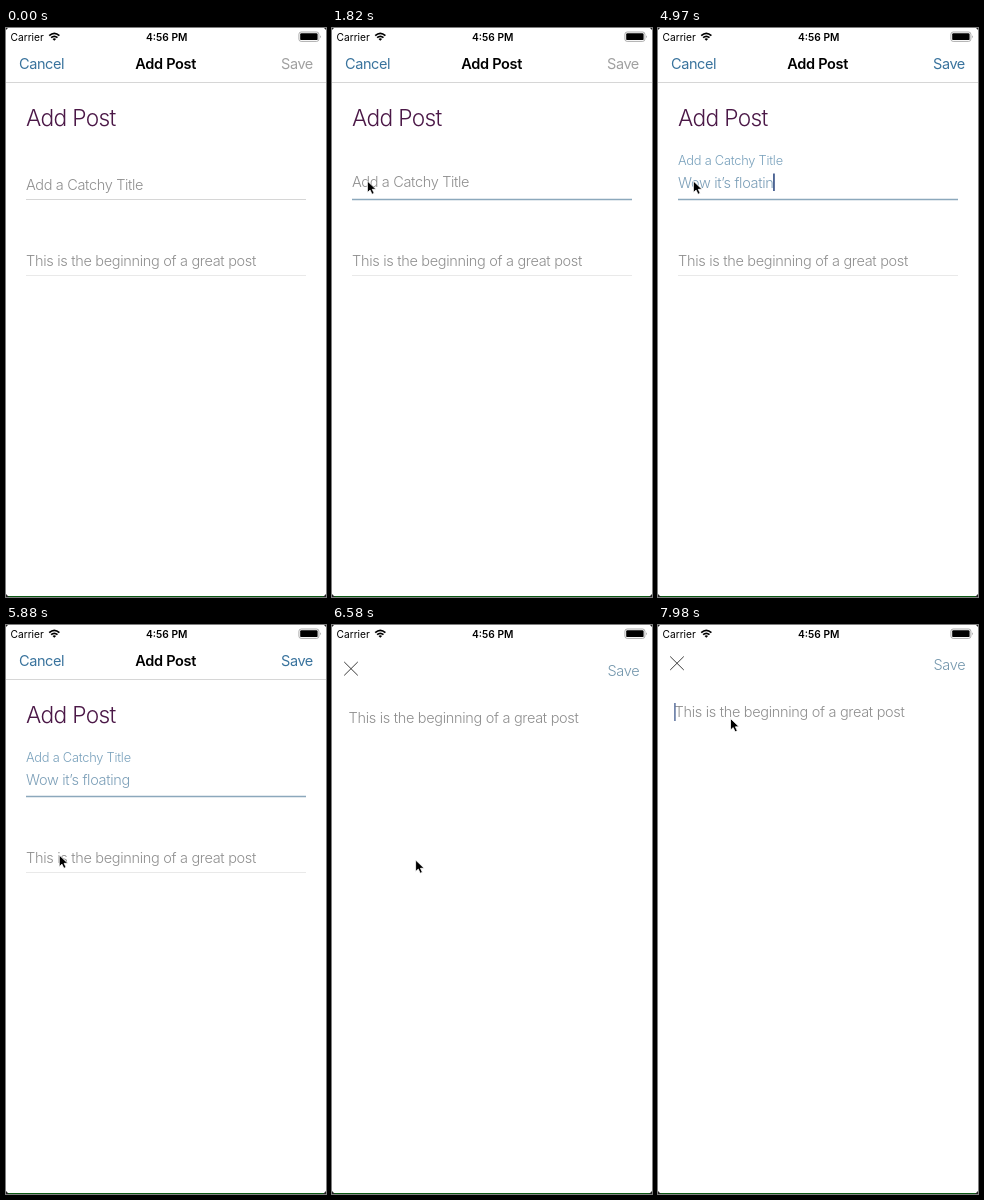
Recreate the animation shown at these times as an HTML page. Size 320 by 569 pixels, loop 8 s.

```html
<!DOCTYPE html>
<html lang="en">
<head>
<meta charset="utf-8">
<title>Add Post</title>
<style>
  html, body { margin: 0; width: 100%; height: 100%; overflow: hidden; background: #fff; }
  svg { display: block; width: 100vw; height: 100vh; }
  text { font: 300 14.5px Inter, "Open Sans", sans-serif; letter-spacing: -.31px; white-space: pre; }
  .hint { fill: #8f8f8f; }
  .link { fill: #39739d; font-weight: 400; letter-spacing: -.42px; }
  .heading { font-size: 22.7px; letter-spacing: -.65px; fill: #4b1847; }
  .bar { font-size: 10.2px; font-weight: 400; letter-spacing: 0; }
  .strong { font-weight: 600; text-anchor: middle; }
  .caret { fill: #465f90; }
</style>
</head>
<body>
<svg viewBox="0 0 320 569">
  <rect width="320" height="569" fill="#fff"/>

  <g id="form">
    <text class="link" x="13" y="41.2">Cancel</text>
    <text class="strong" x="159.7" y="41.2">Add Post</text>
    <text class="link" id="save" x="275" y="41.2">Save</text>
    <path d="M0 54.5H320" stroke="#d6d6d6"/>
    <text class="heading" x="20" y="98">Add Post</text>
    <text id="label" x="20">Add a Catchy Title</text>
    <text id="entry" x="20" y="160" fill="#7c9fb8"></text>
    <rect class="caret" id="caret" y="145.5" width="1.8" height="17.5"/>
    <path id="rule" d="M20 171.5H300"/>
    <text class="hint" x="20" y="238.2">This is the beginning of a great post</text>
    <path d="M20 247.5H300" stroke="#e9e9e9"/>
  </g>

  <g id="sheet">
    <rect width="320" height="569" fill="#fff"/>
    <path d="M12.2 31.5 25.8 45M25.8 31.5 12.2 45" stroke="#3c3c3c"/>
    <text x="275.5" y="45.2" fill="#7396ac">Save</text>
    <text class="hint" x="16.5" y="92.2">This is the beginning of a great post</text>
    <rect class="caret" id="sheetCaret" x="16" y="78" width="1.8" height="18"/>
  </g>

  <g id="statusBar">
    <text class="bar" x="4.5" y="12.6">Carrier</text>
    <g fill="none" stroke="#000" stroke-width="1.7">
      <path d="M43.2 7.6Q48.3 3 53.4 7.6M45.1 9.7Q48.3 6.9 51.5 9.7"/>
      <path d="M48.3 12.7 46.5 10.9Q48.3 9.6 50.1 10.9Z" fill="#000" stroke="none"/>
    </g>
    <text class="bar strong" x="160.7" y="12.6">4:56 PM</text>
    <rect x="292.9" y="4" width="20" height="9.4" rx="2.3" fill="none" stroke="#999" stroke-width=".8"/>
    <rect x="294.2" y="5.3" width="17.4" height="6.8" rx="1.2"/>
    <path d="M314 7.2q1.8 1.5 0 3z" fill="#999"/>
  </g>

  <path id="pointer" d="M0 0V11.6L2.7 9.1 4.6 13.3 6.8 12.3 4.9 8.3H8.6Z" stroke="#fff" stroke-width=".8"/>
  <path d="M0 568.5H320" stroke="#0b5a12"/>
  <path d="M0 0H2L0 2ZM320 0H318L320 2ZM0 569V566L3 569ZM320 569V566L317 569Z" fill="#222"/>
</svg>
<script>
const LOOP = 8000;
const FOCUS = 980, FLOAT = 2100, SHEET = 6168, SHEET_FOCUS = 7400;
const TITLE = "Wow it’s floating";
const KEYS = [2100, 2240, 2380, 2520, 3150, 3290, 3430, 3570, 4200,
              4340, 4480, 4550, 4690, 4760, 4830, 4970, 5110];
// time, x, y of the pointer tip
const PATH = [
  [70, 120, 523], [800, 35.4, 153], [5390, 35.4, 153], [6020, 55.8, 241], [6300, 55.8, 241],
  [6580, 83.6, 235], [6980, 80, 106], [7090, 61, 80], [7210, 72.5, 93.5]
];

const el = Object.fromEntries([...document.querySelectorAll("[id]")].map(e => [e.id, e]));
const set = (e, attrs) => { for (const k in attrs) e.setAttribute(k, attrs[k]); };
const clamp = v => Math.min(1, Math.max(0, v));
const ease = (t, start, length) => {
  const p = clamp((t - start) / length);
  return p * p * (3 - 2 * p);
};
const mix = (a, b, p) => a + (b - a) * p;
const blend = (a, b, p) => `rgb(${a.map((v, i) => Math.round(mix(v, b[i], p)))})`;

// Solid after each key press, then fading out and in once a second
function blink(age) {
  if (age < 0) return 0;
  const a = age % 1000;
  return a < 850 ? 1 - clamp((a - 540) / 160) : clamp((a - 850) / 150);
}

function pointerAt(t) {
  const i = PATH.findIndex(p => p[0] > t);
  if (i < 0) return PATH.at(-1).slice(1);
  if (i === 0) return [-50, -50];
  const [t0, x0, y0] = PATH[i - 1], [t1, x1, y1] = PATH[i];
  const p = ease(t, t0, t1 - t0);
  return [mix(x0, x1, p), mix(y0, y1, p)];
}

function draw(t) {
  const focus = ease(t, 910, 180), float = ease(t, FLOAT, 300);
  const typed = KEYS.filter(k => k <= t).length;

  set(el.label, {
    y: mix(mix(162.2, 159.2, focus), 136.6, float),
    fill: blend([143, 143, 143], [121, 161, 188], float)
  });
  el.label.style.fontSize = mix(14.5, 12.8, float) + "px";
  el.label.style.letterSpacing = mix(-.34, -.22, float) + "px";
  set(el.rule, {
    stroke: blend([214, 214, 214], [140, 168, 188], focus),
    "stroke-width": mix(1, 1.6, focus)
  });
  el.save.style.fill = blend([160, 160, 160], [57, 115, 157], ease(t, FLOAT, 140));

  el.entry.textContent = TITLE.slice(0, typed);
  const width = typed ? el.entry.getComputedTextLength() : 0;
  const lastKey = typed ? KEYS[typed - 1] : FOCUS;
  set(el.caret, {
    x: 19.5 + width,
    opacity: blink(t - lastKey) * (1 - ease(t, 6200, 200))
  });

  // Critically damped spring
  const s = Math.max(0, t - SHEET) * .0162;
  set(el.sheet, { transform: `translate(0 ${569 * (1 + s) * Math.exp(-s)})` });
  set(el.sheetCaret, { opacity: blink(t - SHEET_FOCUS) });
  set(el.pointer, { transform: `translate(${pointerAt(t)})` });
}

function tick() {
  draw(performance.now() % LOOP);
  requestAnimationFrame(tick);
}
tick();
</script>
</body>
</html>
```
